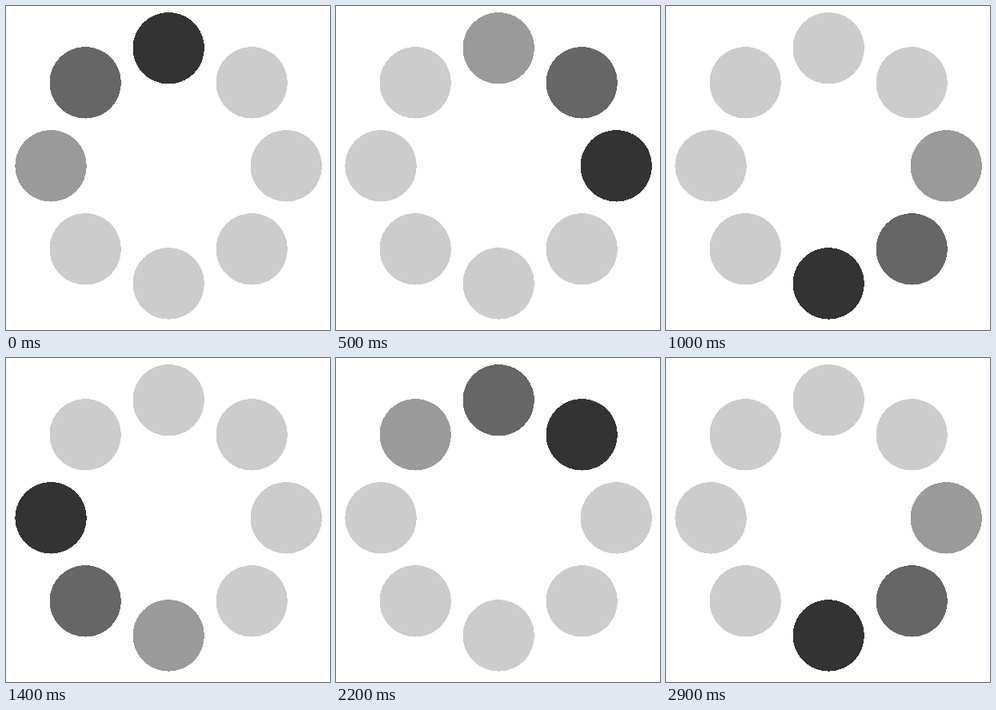
An HTML page for the animation above (3 s loop, 405 px wide and 405 px high).

```html
<!DOCTYPE html>
<html lang="en">
<head>
<meta charset="utf-8">
<title>Loading spinner</title>
<style>
  html, body { margin: 0; width: 100%; height: 100%; overflow: hidden; background: #fff; }
  svg { display: block; width: 100vw; height: 100vh; }
  circle { fill: #ccc; shape-rendering: crispEdges; }
</style>
</head>
<body>
<svg viewBox="0 0 405 405"></svg>
<script>
  const LOOP = 3000, TICK = 100, STEP = 240;
  const COUNT = 8, RING = 147.1, RADIUS = 44.7, CX = 203.22, CY = 199.85;
  const TRAIL = ['#333', '#666', '#9a9a9a'];
  const svg = document.querySelector('svg');

  const dots = Array.from({ length: COUNT }, (_, i) => {
    const angle = i / COUNT * 2 * Math.PI;
    const dot = document.createElementNS('http://www.w3.org/2000/svg', 'circle');
    dot.setAttribute('cx', CX + RING * Math.sin(angle));
    dot.setAttribute('cy', CY - RING * Math.cos(angle));
    dot.setAttribute('r', RADIUS);
    return svg.appendChild(dot);
  });

  // Steps of 240 ms, each rounded to the nearest 100 ms tick.
  function headAt(time) {
    const tick = Math.floor(time % LOOP / TICK);
    return Math.floor((tick + 0.5) * TICK / STEP);
  }

  function draw() {
    const head = headAt(performance.now() - start);
    dots.forEach((dot, i) => {
      const behind = (head - i + COUNT) % COUNT;
      dot.style.fill = TRAIL[behind] || '#ccc';
    });
    requestAnimationFrame(draw);
  }

  const start = performance.now();
  draw();
</script>
</body>
</html>
```
